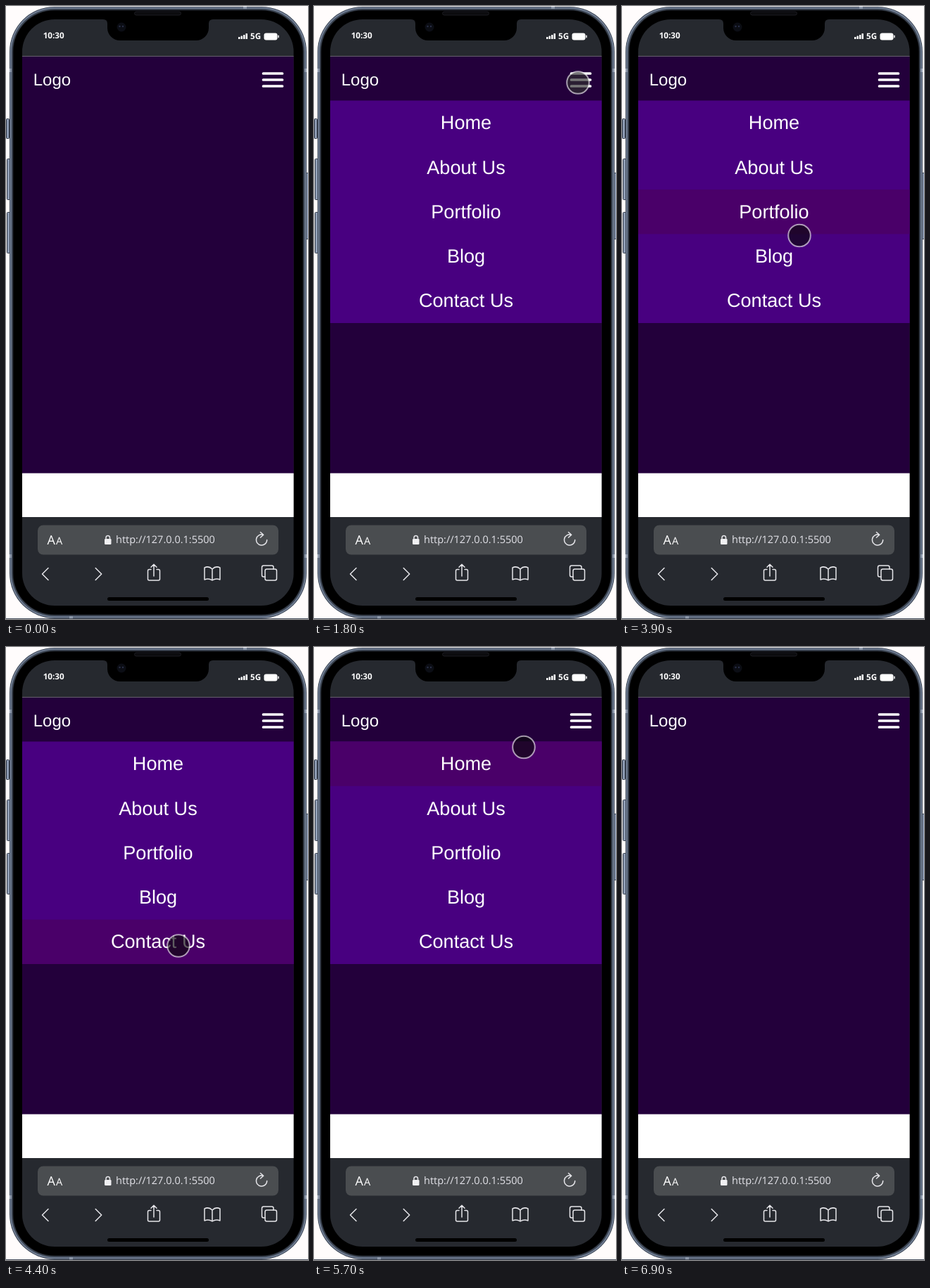
An HTML page that plays this animation: 429x872 px, repeating every 8.3 s.

```html
<!DOCTYPE html>
<html lang="en">
<head>
<meta charset="utf-8">
<title>Mobile menu</title>
<style>
  html, body { margin: 0; width: 100%; height: 100%; overflow: hidden; background: #fffcfc; }
  svg { display: block; width: 429px; height: 872px; }
  text { text-rendering: geometricPrecision; }
  .sans { font-family: "Liberation Sans", Arial, sans-serif; fill: #fff; }
  .ui { font-family: "Open Sans", "Noto Sans", sans-serif; fill: #fff; }
  .line { fill: none; stroke: #e6e6ea; stroke-width: 1.5; stroke-linecap: round; stroke-linejoin: round; }
</style>
</head>
<body>
<svg viewBox="0 0 429 872" xmlns="http://www.w3.org/2000/svg">
  <defs>
    <clipPath id="screen"><rect x="23" y="19" width="385.600" height="834" rx="46"/></clipPath>
  </defs>

  <!-- side buttons -->
  <g fill="#8d9bb3" stroke="#2b3341">
    <rect x=".5" y="160.500" width="4" height="28" rx="1"/>
    <rect x="1.500" y="217.500" width="4" height="58" rx="1"/>
    <rect x="1.500" y="293.500" width="4" height="58" rx="1"/>
    <rect x="426.500" y="237.500" width="3" height="94" rx="1"/>
  </g>
  <rect y="871" width="429" height="1" fill="#4b5260"/>

  <!-- body -->
  <rect x="5" y="1" width="422" height="870" rx="64" fill="#3b4453"/>
  <rect x="6" y="2" width="420" height="868" rx="63" fill="#7a889f"/>
  <rect x="7.500" y="3.500" width="417" height="865" rx="61.500" fill="#434d5c"/>
  <rect x="9.500" y="5.500" width="413" height="861" rx="59.500" fill="#181b21"/>
  <rect x="10.500" y="6.500" width="411" height="859" rx="58.500" fill="#000"/>
  <g fill="#8e99ab">
    <rect x="5" y="89" width="3" height="5"/>
    <rect x="424" y="89" width="3" height="5"/>
    <rect x="5" y="780" width="3" height="5"/>
    <rect x="424" y="780" width="3" height="5"/>
    <rect x="337" y="1" width="5" height="3"/>
    <rect x="90" y="868" width="5" height="3"/>
  </g>

  <g clip-path="url(#screen)">
    <rect x="23" y="19" width="386" height="834" fill="#26292f"/>
    <rect x="23" y="71" width="386" height="1" fill="#66606d"/>
    <rect x="23" y="72" width="386" height="593" fill="#23003b"/>
    <rect x="23" y="664.600" width="386" height="62.400" fill="#fff"/>
  </g>

  <!-- notch -->
  <path d="M138 19Q144 19 144 25V31A18 18 0 0 0 162 49H270A18 18 0 0 0 288 31V25Q288 19 294 19V17H138Z" fill="#000"/>
  <rect x="182.500" y="8" width="66" height="5" rx="2.500" fill="#0b0b0e" stroke="#1b1b20"/>
  <circle cx="164" cy="30" r="6.500" fill="#0b0d14"/>
  <circle cx="161.500" cy="29" r="1.200" fill="#2a3048"/>
  <circle cx="166" cy="29" r="1.200" fill="#2a3048"/>

  <!-- status bar -->
  <g class="ui" font-size="11.700" font-weight="700">
    <text x="52.700" y="46">10:30</text>
    <text x="347" y="46.500">5G</text>
    <rect x="330" y="44" width="2.500" height="3" rx=".6"/>
    <rect x="333.500" y="42.500" width="2.500" height="4.500" rx=".6"/>
    <rect x="337" y="41" width="2.500" height="6" rx=".6"/>
    <rect x="340.500" y="39" width="2.500" height="8" rx=".6"/>
    <rect x="366.500" y="38.500" width="19" height="10" rx="3"/>
    <rect x="386.300" y="41.500" width="1.400" height="4" rx=".7"/>
  </g>

  <!-- page header -->
  <text class="sans" x="38.700" y="113" font-size="24">Logo</text>
  <path d="M365.500 96H392.500M365.500 105H392.500M365.500 114H392.500" stroke="#fff" stroke-width="3.700" stroke-linecap="round"/>

  <g id="menu" class="sans" font-size="27.100" text-anchor="middle"></g>

  <!-- browser bar -->
  <rect x="45" y="738.500" width="342" height="42" rx="8" fill="#4a4d50"/>
  <g class="ui">
    <text x="58.500" y="765.500" font-size="18">A</text>
    <text x="71" y="765.500" font-size="14.500">A</text>
    <text x="156" y="764" font-size="14.500" font-weight="500" fill="#e4e4ea">http://127.0.0.1:5500</text>
  </g>
  <rect x="140" y="758" width="9.500" height="8" rx="1.200" fill="#f0f0f2"/>
  <path class="line" d="M142 758V756.200a2.750 2.750 0 0 1 5.500 0V758"/>
  <g class="line">
    <path d="M365.500 752.200A7.600 7.600 0 1 0 370.700 759.500M361.500 748.500L365.700 752.300L361.500 756"/>
    <path d="M60 799.500L51.500 808L60 816.500M127.200 799.500L135.700 808L127.200 816.500"/>
    <path d="M206 801.500H203.500Q201.500 801.500 201.500 803.500V815Q201.500 817 203.500 817H216.500Q218.500 817 218.500 815V803.500Q218.500 801.500 216.500 801.500H214M210 811V794.500M206 798.300L210 794.300L214 798.300"/>
    <path d="M293 801Q288 796 282 799V816Q288 813.500 293 817Q298 813.500 304 816V799Q298 796 293 801V817"/>
    <path d="M368 812H366Q363.500 812 363.500 809.500V798.500Q363.500 796 366 796H377.500Q380 796 380 798.500V801"/>
    <rect x="368" y="801" width="16.500" height="16" rx="2.500"/>
  </g>
  <rect x="144" y="841" width="144" height="5" rx="2.500" fill="#000"/>

  <circle id="touch" r="15.800" stroke="#fff" stroke-opacity=".6" stroke-width="2" fill-opacity=".65"/>
</svg>
<script>
  const LOOP = 8300, STEP = 100;
  const TOP = 134.5, ROW = 63.3, WIDTH = 385.6;
  const OPEN = 1700, CLOSE = 6600, LEAVE = 6900;
  const labels = ["Home", "About Us", "Portfolio", "Blog", "Contact Us"];

  // time, x, y
  const path = [
    [600, 400, 250], [1100, 375, 109], [2500, 375, 109],
    [2900, 298, 168], [3000, 298, 168], [3100, 291.7, 190.7],
    [3900, 252, 326.5], [4400, 245, 425], [5000, 255, 280.5],
    [5700, 298, 142.5], [6100, 375, 109], [LEAVE, 375, 109]
  ];

  const menu = document.getElementById("menu");
  const touch = document.getElementById("touch");

  function add(name, attrs) {
    const el = document.createElementNS("http://www.w3.org/2000/svg", name);
    for (const key in attrs) el.setAttribute(key, attrs[key]);
    return menu.appendChild(el);
  }

  add("rect", { x: 23, y: TOP, width: WIDTH, height: ROW * labels.length, fill: "#480080" });
  const hover = add("rect", { x: 23, width: WIDTH, height: ROW, fill: "#4a0069" });
  labels.forEach((label, i) => {
    add("text", { x: 216, y: TOP + ROW * i + 40.7 }).textContent = label;
  });

  function position(t) {
    const i = path.findIndex(key => key[0] > t);
    const a = path[i - 1], b = path[i];
    const k = (t - a[0]) / (b[0] - a[0]);
    return [a[1] + (b[1] - a[1]) * k, a[2] + (b[2] - a[2]) * k];
  }

  const show = (el, on) => el.setAttribute("visibility", on ? "visible" : "hidden");

  function draw(time) {
    const t = Math.floor((time % LOOP) / STEP) * STEP;
    const open = t >= OPEN && t < CLOSE;
    const touching = t >= path[0][0] && t < LEAVE;
    let row = -1;
    if (touching) {
      const [x, y] = position(t);
      const pressed = (t >= 1600 && t < 2600) || t >= CLOSE;
      touch.setAttribute("cx", x);
      touch.setAttribute("cy", y);
      touch.setAttribute("fill", pressed ? "#30302f" : "#0a080c");
      row = Math.floor((y - 3 - TOP) / ROW);
    }
    const over = open && row >= 0 && row < labels.length;
    if (over) hover.setAttribute("y", TOP + ROW * row);
    show(menu, open);
    show(hover, over);
    show(touch, touching);
  }

  const start = performance.now();
  function tick() {
    draw(performance.now() - start);
    requestAnimationFrame(tick);
  }
  tick();
</script>
</body>
</html>
```
